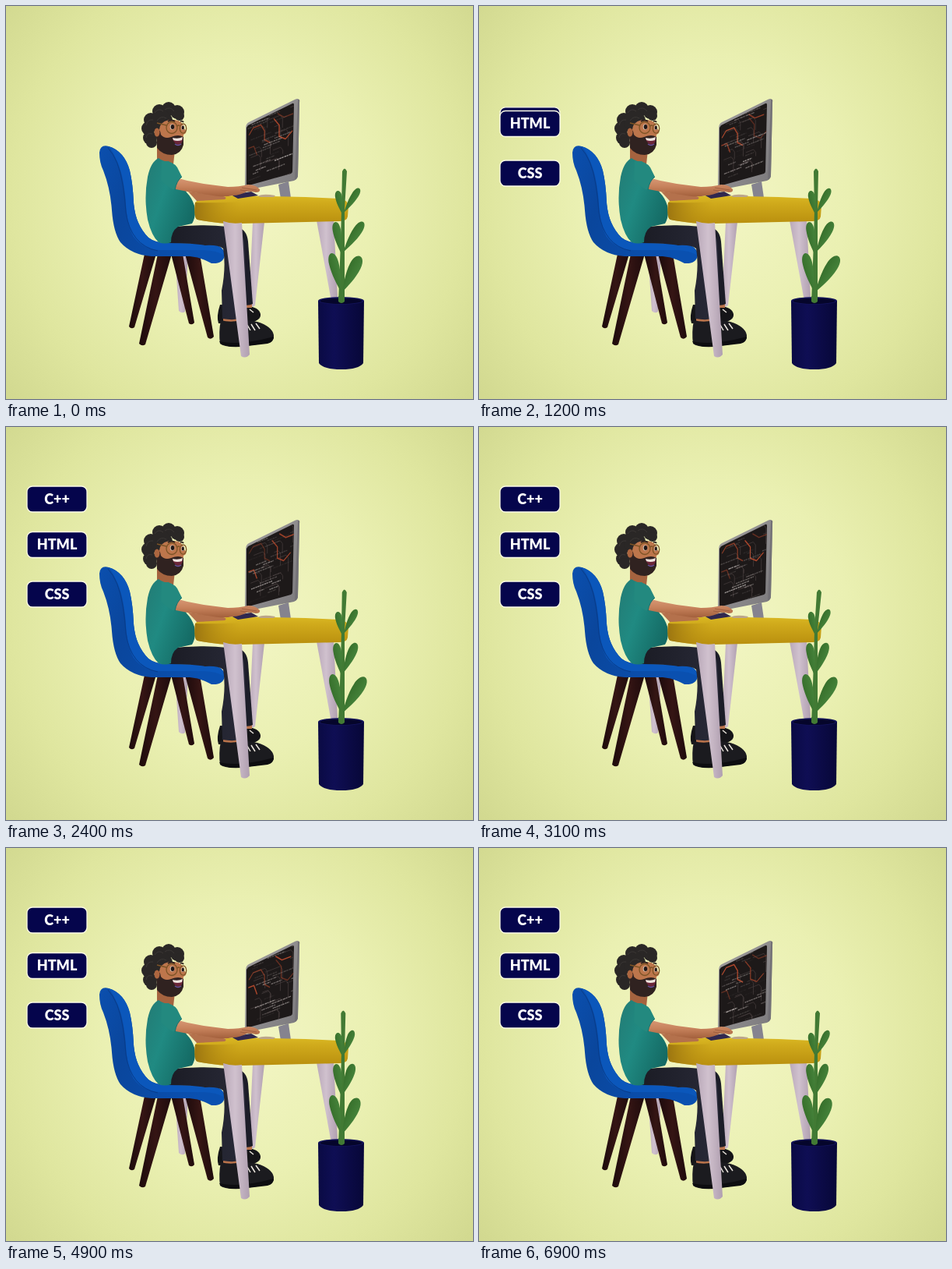
Animation of 600 by 504 pixels, one loop 7 s. Source, as an HTML page:

```html
<!DOCTYPE html>
<html lang="en">
<head>
<meta charset="utf-8">
<title>Developer at a desk</title>
<style>
html, body { margin: 0; width: 100%; height: 100%; overflow: hidden; background: #e2e8a4; }
svg { display: block; width: 600px; height: 504px; }
text { font: 900 18px Lato, "Open Sans", sans-serif; fill: #fff; text-anchor: middle; }
</style>
</head>
<body>
<svg viewBox="0 0 600 504">
<defs>
  <radialGradient id="bg" gradientUnits="userSpaceOnUse" cx="300" cy="245" r="390">
    <stop offset="0" stop-color="#f3f6c5"/><stop offset=".45" stop-color="#eaf0b2"/>
    <stop offset=".75" stop-color="#dfe69f"/><stop offset="1" stop-color="#d2d990"/>
  </radialGradient>
  <linearGradient id="bezel" x2="1" y2="1"><stop stop-color="#a19f9f"/><stop offset="1" stop-color="#7b797c"/></linearGradient>
  <linearGradient id="blue" x2="1" y2=".4"><stop stop-color="#0b4fae"/><stop offset=".35" stop-color="#0a469c"/><stop offset="1" stop-color="#0a50b0"/></linearGradient>
  <linearGradient id="teal" x2="1" y2=".6"><stop stop-color="#237b74"/><stop offset=".45" stop-color="#208a82"/><stop offset="1" stop-color="#146a64"/></linearGradient>
  <linearGradient id="skin" x2="0" y2="1"><stop stop-color="#d99b78"/><stop offset=".5" stop-color="#c7825c"/><stop offset="1" stop-color="#a3603c"/></linearGradient>
  <linearGradient id="desk" x2="0" y2="1"><stop stop-color="#dab823"/><stop offset=".3" stop-color="#cfa91b"/><stop offset="1" stop-color="#b98f0e"/></linearGradient>
  <linearGradient id="side"><stop stop-color="#9c7510"/><stop offset="1" stop-color="#c19814" stop-opacity="0"/></linearGradient>
  <linearGradient id="leg"><stop stop-color="#b9a8b8"/><stop offset=".45" stop-color="#d0c1ce"/><stop offset="1" stop-color="#b09fb0"/></linearGradient>
  <linearGradient id="wood"><stop stop-color="#1c0a0b"/><stop offset=".5" stop-color="#351514"/><stop offset="1" stop-color="#1f0b0c"/></linearGradient>
  <linearGradient id="pants"><stop stop-color="#1b1c25"/><stop offset="1" stop-color="#292a38"/></linearGradient>
  <linearGradient id="pot"><stop stop-color="#0a0a44"/><stop offset=".35" stop-color="#0f0e54"/><stop offset="1" stop-color="#070738"/></linearGradient>
  <linearGradient id="green"><stop stop-color="#37702c"/><stop offset="1" stop-color="#45823a"/></linearGradient>
  <clipPath id="glass"><path d="M311 153L368 125Q370 124 370 127L368 212Q368 214 366 215L312 230Q309 231 309 228V156Z"/></clipPath>
</defs>
<rect width="600" height="504" fill="url(#bg)"/>

<!-- monitor -->
<path d="M350 229L363 225L366 246L353 247Z" fill="#85838f"/>
<path d="M308 157Q308 151 312 149L371 120Q377 117 377 123L375 217Q375 222 370 224L314 235Q307 236 307 231Z" fill="url(#bezel)"/>
<path d="M375 120Q378 119 377 124L375 217Q375 221 371 223Z" fill="#737176"/>
<g clip-path="url(#glass)">
  <path d="M300 110h80v130h-80z" fill="#1d1919"/>
  <g id="screen" transform="matrix(.59 -.23 -.01 .8 310 153)" fill="none"></g>
</g>

<!-- rear desk legs -->
<g fill="url(#leg)">
  <path d="M317 277H332L320 384Q316 387 312 384Z"/>
  <path d="M217 318H234L230 392Q226 395 222 391Z"/>
  <path d="M399 275H421L426 373Q421 377 417 373Z"/>
</g>

<!-- chair -->
<g fill="url(#wood)">
  <path d="M178 318H193L165 412Q161 415 158 411Z"/>
  <path d="M212 318H227L242 406Q239 410 235 407Z"/>
  <path d="M195 318H213L179 434Q175 437 171 433Z"/>
  <path d="M230 318H249L267 424Q263 429 259 425Z"/>
</g>
<path d="M120 188Q121 177 132 180Q152 186 159 211Q163 228 164 252Q166 280 183 297Q193 305 212 304L266 305Q281 309 281 320Q279 331 264 330Q250 322 236 321L187 321Q161 319 147 303Q138 290 136 262Q134 234 125 211Q120 201 120 188Z" fill="url(#blue)"/>
<path d="M132 180Q152 186 159 211Q163 228 164 252Q166 280 183 297Q193 305 212 304L266 305Q281 309 281 320Q270 313 250 313L199 313Q177 313 164 296Q156 283 154 255Q152 222 144 202Q138 187 132 180Z" fill="#0b57bb"/>
<path d="M131 182Q145 197 150 229Q153 248 154 264Q160 307 195 314" fill="none" stroke="#083c8a"/>

<!-- trousers and shoes -->
<path d="M275 383Q270 398 273 407L314 406Q328 403 327 395Q325 386 310 385Z" fill="#151518"/>
<path d="M309 381H316V387H309ZM279 399H305V406H279Z" fill="#b9734b"/>
<path d="M296 284Q309 285 311 302L317 382Q312 385 304 383L290 310Z" fill="#1c1d28"/>
<path d="M209 284Q245 279 285 283Q306 285 307 310L309 399Q295 404 278 401L277 365Q283 335 279 311Q272 306 256 307Q240 304 209 304Z" fill="url(#pants)"/>
<path d="M276 403Q290 407 306 402L323 405Q342 411 344 422Q345 430 336 432L302 437Q280 438 275 433Q273 418 276 403Z" fill="#1b1b1f"/>
<path d="M274 430Q300 436 344 424Q344 431 336 433L302 437Q278 438 274 430Z" fill="#0d0d10"/>
<path d="M310 409l4 7M315 408l5 8M321 407l5 7M313 389l5 4" stroke="#e9e4dc" stroke-width="1.5"/>

<!-- body -->
<path d="M194 182L217 185L215 203Q206 205 194 199Z" fill="#a5633f"/>
<path d="M196 195Q186 200 182 219Q177 246 182 274Q187 295 196 303Q205 306 212 303Q212 289 221 283L239 279Q245 269 242 256Q239 246 232 239L224 224Q219 205 209 199Q202 200 196 195Z" fill="url(#teal)"/>

<!-- desk -->
<path d="M243 252Q246 248 256 247L292 243L385 245L428 247Q440 249 440 256L439 270Q438 276 428 276L300 279Q276 280 246 274Q241 273 243 252Z" fill="url(#desk)"/>
<path d="M243 252Q268 253 302 251V279Q276 280 246 274Q241 273 243 252Z" fill="url(#side)"/>
<path d="M279 276Q290 280 303 278L313 447Q308 453 302 449Z" fill="url(#leg)"/>

<!-- keyboard and mouse -->
<path d="M289 242L315 238L324 243L298 247Z" fill="#30284f"/>
<path d="M324 244Q329 240 346 243L344 245H327Z" fill="#bba58b"/>

<!-- arms -->
<path d="M234 238L275 243Q286 245 281 248L245 250Z" fill="#b4714c"/>
<path d="M214 219Q234 225 254 228L285 232Q300 232 311 229Q321 229 326 235Q327 239 321 239L311 237Q301 243 291 243Q280 246 260 242Q235 239 213 234Z" fill="url(#skin)"/>
<path d="M303 233L322 236M301 236L315 238" stroke="#97583c" stroke-width=".8"/>
<path d="M200 199Q214 198 220 207L226 219Q219 224 217 236Q206 232 199 223Z" fill="#23897f"/>
<path d="M226 219Q219 224 217 236" fill="none" stroke="#17716b"/>

<!-- head -->
<g fill="#2a2726">
  <circle cx="197" cy="135" r="9"/><circle cx="209" cy="132" r="9"/><circle cx="220" cy="136" r="9"/>
  <circle cx="186" cy="146" r="9"/><circle cx="183" cy="157" r="9"/><circle cx="185" cy="169" r="9"/>
  <circle cx="187" cy="175" r="7"/><circle cx="200" cy="148" r="14"/><circle cx="223" cy="141" r="6"/>
</g>
<path d="M198 154Q202 145 216 146Q228 147 229 157Q234 162 228 165L227 178Q220 186 207 184Q196 180 195 166Z" fill="#bd764c"/>
<g fill="none" stroke="#3b3735">
  <path d="M191 137q5-7 11-2M204 133q7-5 12 2M180 153q2-8 9-7M180 169q1-7 8-5M194 147q5-7 12-3"/>
</g>
<path d="M193 160Q198 156 199 165Q204 171 212 168Q222 164 228 168L228 178Q225 190 213 191Q201 191 194 182Z" fill="#302220"/>
<ellipse cx="194" cy="162" rx="3.5" ry="5.5" fill="#ad663f"/>
<path d="M214 170Q221 172 227 169Q227 177 222 178Q216 177 214 170Z" fill="#6b2638"/>
<path d="M214 169Q221 171 227 168L226 172Q220 174 215 172Z" fill="#eee5df"/>
<path d="M217 177Q221 180 225 177" fill="none" stroke="#6654a0" stroke-width="1.3"/>
<ellipse cx="213.5" cy="155" rx="2.8" ry="3.5" fill="#d9cabd"/><ellipse cx="227" cy="156" rx="1.8" ry="3" fill="#d9cabd"/>
<ellipse cx="214" cy="155" rx="2.3" ry="3" fill="#211716"/><ellipse cx="227.3" cy="156" rx="1.6" ry="2.6" fill="#211716"/>
<path d="M208 148q5-3 9 0M224 148q3-1 4 1" fill="none" stroke="#2a201d" stroke-width="1.8"/>
<g fill="none" stroke="#7d5426" stroke-width="1.3">
  <ellipse cx="213" cy="156" rx="7" ry="7.5"/><ellipse cx="227.5" cy="157" rx="4.2" ry="6.2"/>
  <path d="M220 154q2-2 3 0M206 153L194 150"/>
</g>

<!-- plant -->
<g id="plant"></g>
<path d="M401 378L402 458Q408 466 431 466Q453 466 459 458L460 378Z" fill="url(#pot)"/>
<ellipse cx="430.5" cy="378" rx="29.5" ry="5" fill="#121258"/>
<ellipse cx="430.5" cy="378.3" rx="27" ry="3.6" fill="#05052b"/>
<path d="M427 379V372H435V379Q431 383 427 379Z" fill="#427a34"/>

<g id="tags"></g>
</svg>
<script>
const LOOP = 7000, STEP = 100;
const $ = id => document.getElementById(id);
const clamp = v => Math.min(1, Math.max(0, v));
const ease = v => v < .5 ? 2 * v * v : 1 - 2 * (1 - v) ** 2;
const progress = (t, start, end) => clamp((t - start) / (end - start));
const rand = n => { const v = Math.sin(n * 127.1 + 31.7) * 43758.5453; return v - Math.floor(v); };

const times = [0, 700, 1800, 3100, 4100, 5800, 6900];
function sway(values, t) {
  let i = 0;
  while (i < times.length - 2 && t >= times[i + 1]) i++;
  const p = progress(t, times[i], times[i + 1]);
  return values[i] + (values[i + 1] - values[i]) * (p * p * (3 - 2 * p));
}

const stemTop = [435, 433, 433, 437, 431, 436, 435];
// base x, base y, tip y, half width, tip x over time
const leaves = [
  [430, 366, 317, 6.2, [418, 419, 419, 419, 419, 419, 419]],
  [432, 367, 321, 7.5, [455, 460, 464, 458, 454, 450, 450]],
  [430, 316, 277, 5.2, [423, 424, 424, 424, 424, 424, 424]],
  [433, 316, 277, 5.8, [459, 456, 452, 447, 446, 446, 446]],
  [431, 265, 237, 4.4, [426, 426, 426, 426, 426, 426, 426]],
  [434, 265, 234, 4.5, [454, 451, 451, 450, 446, 446, 449]]
];

function leaf(x, y, tipX, tipY, w) {
  const len = Math.hypot(tipX - x, tipY - y);
  const angle = Math.atan2(tipX - x, y - tipY) * 180 / Math.PI;
  const d = `M0 0C${-w * .4} ${-len * .2} ${-w} ${-len * .45} ${-w} ${-len * .73}` +
    `C${-w} ${-len * 1.09} ${w} ${-len * 1.09} ${w} ${-len * .73}C${w} ${-len * .45} ${w * .4} ${-len * .2} 0 0Z`;
  return `<path transform="translate(${x} ${y}) rotate(${angle})" d="${d}" fill="url(#green)"/>`;
}

function drawPlant(t) {
  const top = sway(stemTop, t);
  const stem = `<path d="M427 380Q430 310 431 260L${top - 3} 212Q${top} 205 ${top + 3} 212` +
    `L435 260Q435 320 435 380Z" fill="#427a34"/>`;
  $('plant').innerHTML = stem +
    leaves.map(([x, y, tipY, w, tips]) => leaf(x, y, sway(tips, t), tipY, w)).join('');
}

const stroke = (d, color, width, extra = '') =>
  `<path d="${d}" stroke="${color}" stroke-width="${width}" ${extra}/>`;

function drawScreen(t) {
  const s = t / 1000;
  let out = '';
  // dim circuit traces
  for (let i = 0; i < 14; i++) {
    const x = rand(i) * 95, y = (rand(i + 20) * 120 + s * 3) % 120 - 10;
    out += stroke(`M${x} ${y}h${8 + rand(i + 40) * 26}l5 6v${6 + rand(i + 60) * 22}`, '#453c3d', 1);
  }
  // glowing traces
  const shift = Math.sin(s * 1.7) * 5;
  const glow = [
    `M4 ${17 + shift}l9-9h17l8 12v14l12 8`,
    `M${58 + shift} 6l12 14v18l14 8 15-9`,
    `M${66 - shift} 0l14 10h20M3 ${38 - shift}h12l7 16`
  ];
  glow.forEach((d, i) => {
    const alpha = .6 + .3 * Math.sin(s * 2 + i * 2);
    out += stroke(d, '#8f3520', 2.2, `opacity="${alpha}"`) + stroke(d, '#d96842', .8, `opacity="${alpha}"`);
  });
  // scrolling code
  for (let i = 0; i < 30; i++) {
    const y = (i * 4 + s * 9) % 120 - 10;
    const x = (rand(i + 80) * 75 + s * (rand(i) - .5) * 8 + 100) % 100;
    const width = 10 + rand(i + 120) * 38;
    const alpha = clamp(.45 + .5 * Math.sin(s * 1.5 + i * .65)) * (y > 38 ? .8 : .4);
    out += stroke(`M${x} ${y}h${width}`, i % 3 ? '#a09896' : '#ddd6d2', 1.8,
      `opacity="${alpha}" stroke-dasharray="${2 + rand(i + 9) * 5} 1 3 .8 1 1"`);
  }
  $('screen').innerHTML = out;
}

const tag = (label, y, scale) => `<g transform="translate(65.5 ${y}) scale(${scale})">
  <rect x="-38.5" y="-16.5" width="77" height="33" rx="7" fill="#05054c" stroke="#fbfbe6" stroke-width="1.3"/>
  <text y="6">${label}</text></g>`;

function drawTags(t) {
  const htmlY = 214.5 - 63.5 * ease(progress(t, 600, 1050));
  const cppY = htmlY - 58.5 * ease(progress(t, 1100, 1600));
  let out = '';
  if (t > 1000) out += tag('C++', cppY, 1);
  if (t > 600) out += tag('HTML', htmlY, 1);
  if (t > 200) out += tag('CSS', 214.5, ease(progress(t, 200, 500)));
  $('tags').innerHTML = out;
}

function render(now) {
  const t = Math.floor(now % LOOP / STEP) * STEP;
  drawPlant(t);
  drawScreen(t);
  drawTags(t);
}

const start = performance.now();
function tick() {
  render(performance.now() - start);
  requestAnimationFrame(tick);
}
tick();
</script>
</body>
</html>
```
